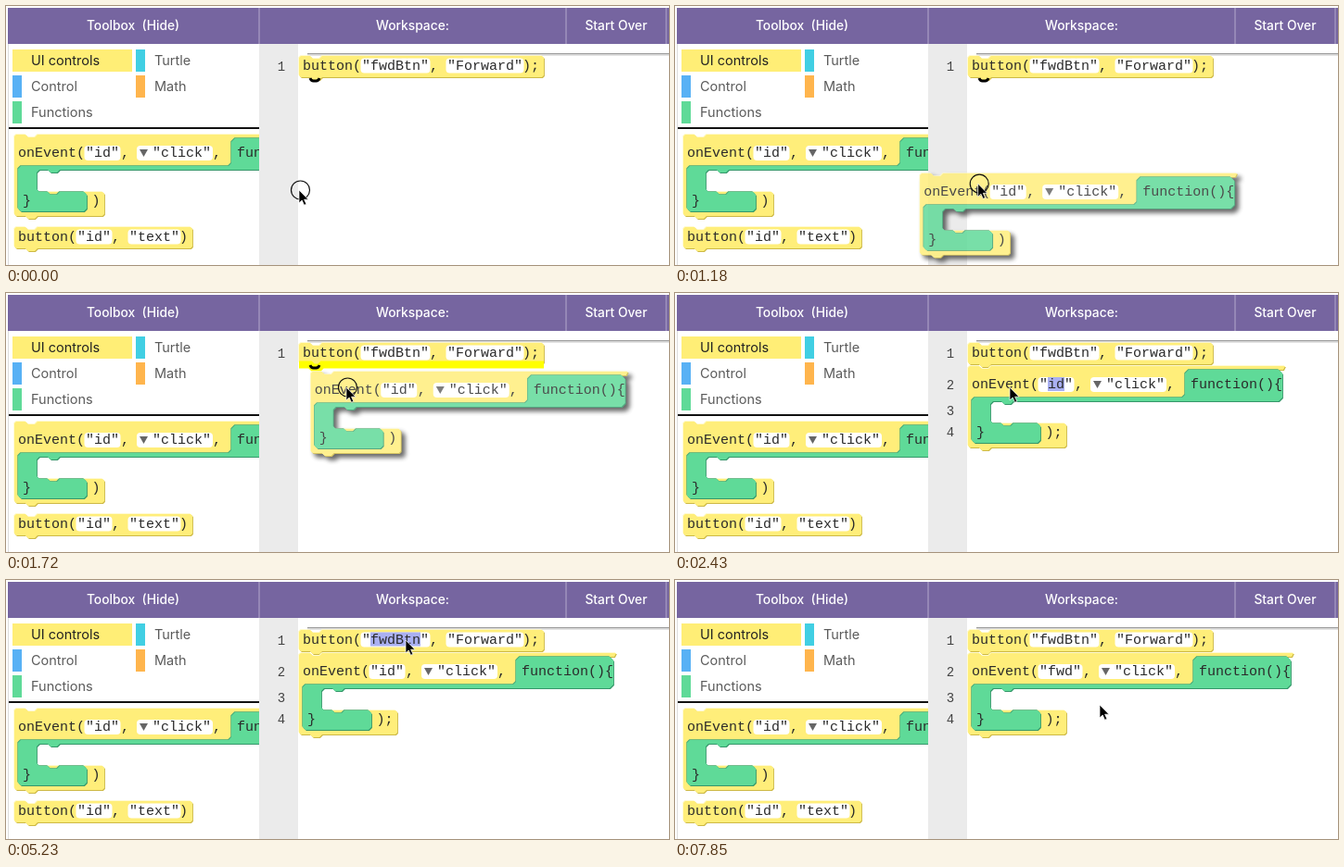
Recreate the animation shown at these times as an HTML page. Size 715 by 280 pixels, loop 8000 ms.

```html
<!DOCTYPE html>
<html lang="en">
<head>
<meta charset="utf-8">
<title>Block editor</title>
<style>
  html, body { margin: 0; width: 100%; height: 100%; overflow: hidden; background: #fff; }
  svg { display: block; width: 715px; height: 280px; }
  text { white-space: pre; }
  .ui { font: 14.5px Inter, "Open Sans", sans-serif; fill: #5b5b5b; }
  .head { font: 500 13.8px Inter, "Open Sans", sans-serif; fill: #fff; text-anchor: middle; }
  .code { font: 15px "Liberation Mono", monospace; fill: #2a2a2a; }
  .num { font: 14px "Liberation Mono", monospace; fill: #444; text-anchor: middle; }
  #drag { opacity: .84; filter: drop-shadow(4.5px 4.5px 2.5px rgba(0, 0, 0, .7)); }
</style>
</head>
<body>
<svg id="stage" viewBox="0 0 715 280"></svg>
<script>
const LOOP = 8000, CH = 9;
const YELLOW = ['#fff9c4', '#cdb945', '#ffee7a'];
const GREEN = ['#48a978', '#35976a', '#5fda98'];
const SELECT = '#aab0f2';

const rect = (x, y, w, h, fill, r = 0) =>
  `<rect x="${x}" y="${y}" width="${w}" height="${h}" rx="${r}" fill="${fill}"/>`;
const label = (cls, x, y, s) => `<text class="${cls}" x="${x}" y="${y}">${s}</text>`;
const code = (x, y, s) => label('code', x, y, s);
const group = (id, body, attrs = '') => `<g id="${id}" ${attrs}>${body}</g>`;
const at = (x, y, body) => `<g transform="translate(${x} ${y})">${body}</g>`;

// Bevelled shape: separate upper left and lower right edges.
const bevel = (d, [upper, lower, fill]) =>
  `<path d="${d}" fill="${lower}" transform="translate(.9 .9)"/>` +
  `<path d="${d}" fill="${upper}" transform="translate(-.7 -.7)"/>` +
  `<path d="${d}" fill="${fill}"/>`;

const NOTCH = 'l3 3h7l3 -3', TAB = 'l-3 3h-7l-3 -3';

function socket(x, y, word, sel) {
  const w = (word.length + 2) * CH;
  return rect(x - 1.5, y - 12, w + 3, 16, '#fff', 4) +
    (sel ? rect(x + CH, y - 12, word.length * CH, 15, SELECT) : '') +
    code(x, y, `"${word}"`);
}

function buttonBlock(id, caption, end, sel) {
  const x1 = 68, x2 = x1 + (id.length + 2) * CH + 20, y = 14.5;
  const x3 = x2 + (caption.length + 2) * CH, right = x3 + end.length * CH + 5;
  const d = `M2 0H12${NOTCH}H${right - 2}l2 2V21l-2 2H25${TAB}H2l-2 -2V2Z`;
  return bevel(d, YELLOW) + code(4, y, 'button(') + socket(x1, y, id, sel) +
    code(x2 - 19, y, ',') + socket(x2, y, caption) + code(x3, y, end);
}

function eventOutline(shift, end) {
  const foot = 87 + end.length * CH + 1;
  return `M2 0H12${NOTCH}H${342 + shift}l-2 4H${240 + shift}V36H4V62H${foot - 2}l2 2V86l-2 2` +
    `H25${TAB}H2l-2 -2V2Z`;
}

function eventBlock(id, end, sel) {
  const s = (id.length - 2) * CH;
  const arm = `M4 37l3 -3H${231 + s}l3 -3V8l4 -4H${335 + s}l4 4V34l-4 4` +
    `H49${TAB}H27l-3 3V59l3 3H36${NOTCH}H75l3 3V80l-3 3H7l-3 -3Z`;
  return bevel(eventOutline(s, end), YELLOW) + bevel(arm, GREEN) +
    code(4, 24, 'onEvent(') + socket(77, 24, id, sel) + code(115 + s, 24, ',') +
    rect(132 + s, 12, 82, 16, '#fff', 4) +
    `<path d="M${135 + s} 16h9l-4.5 8Z" fill="#666"/>` +
    code(149 + s, 24, '"click"') + code(214 + s, 24, ',') +
    code(240 + s, 24, 'function(){') + code(9, 76, '}') + code(83.5, 76, end);
}

const category = (x, y, color, name) =>
  rect(x, y, 10, 24, color) + label('ui', x + 20, y + 17, name);
const lineNo = (n, y) => label('num', 297, y, n);

const stage = document.getElementById('stage');
stage.innerHTML =
  '<clipPath id="box"><rect x="0" y="41" width="273" height="239"/></clipPath>' +
  rect(2, 41, 1, 239, '#ddd') +
  rect(273, 41, 42, 239, '#ebebeb') +
  rect(2, 2, 713, 39, '#7665a0') +
  [273, 604, 712].map(x => rect(x - .5, 2, 1, 39, '#b3a9cc')).join('') +
  label('head', 137, 26, 'Toolbox  (Hide)') +
  label('head', 438.5, 26, 'Workspace:') +
  label('head', 658, 26, 'Start Over') +
  rect(7, 47, 129, 24, '#ffee76') +
  '<text class="ui" x="27" y="64" style="fill:#222">UI controls</text>' +
  category(140, 47, '#41cfe3', 'Turtle') +
  category(7, 75, '#58b1f5', 'Control') +
  category(140, 75, '#ffb54d', 'Math') +
  category(7, 103, '#5fda98', 'Functions') +
  rect(3, 131, 270, 2, '#111') +
  group('palette',
    at(9, 139, eventBlock('id', ')') +
      `<path id="hover" d="${eventOutline(0, ')')}" fill="none" stroke="#ff0" stroke-width="3"/>`) +
    at(9, 239, buttonBlock('id', 'text', ')')),
    'clip-path="url(#box)"') +
  rect(325, 51, 390, 1.5, '#9c9c9c') + rect(325, 52.5, 390, 1.5, '#e2e2e2') +
  lineNo(1, 69.5) +
  group('first', '') +
  group('target', `<path d="M316 77.500H328${NOTCH}H580" fill="none" stroke="#ff0" stroke-width="8"/>`) +
  group('smile', '<path d="M328 78q1 3 3.500 3h3q2.500 0 3.500 -3" fill="none" stroke="#000" stroke-width="2.800"/>') +
  group('lines', lineNo(2, 103.5) + lineNo(3, 132) + lineNo(4, 155)) +
  group('second', '') +
  group('caret', rect(0, 92, 1.4, 13, '#222')) +
  group('dragAt', group('drag', eventBlock('id', ')'))) +
  group('ring', '<circle cx="1.500" cy="0" r="10" fill="none" stroke="#111" stroke-width="1.2"/>') +
  group('arrow', '<path d="M0 0V14l3.200 -3 2.300 5.200 2.400 -1 -2.300 -5H10Z" fill="#000" stroke="#fff" stroke-width=".7"/>');

const $ = id => document.getElementById(id);
const show = (id, on) => $(id).setAttribute('visibility', on ? 'visible' : 'hidden');
const move = (id, x, y) => $(id).setAttribute('transform', `translate(${x} ${y})`);
const within = (t, a, b) => t >= a && t < b;

// Pointer path: time, x, y
const PATH = [
  [0, 316, 199], [300, 316, 199], [850, 51, 157], [1070, 52, 157], [1130, 190, 199],
  [1165, 301, 198], [1180, 326, 192.5], [1330, 396, 142], [1500, 384, 109], [1720, 367, 102],
  [1890, 361, 102], [2430, 361, 102], [2830, 433, 95], [3010, 433, 95], [3130, 480, 149],
  [3430, 480, 149], [4000, 416, 103], [4180, 416, 103], [4480, 446, 82], [4820, 431, 65],
  [5590, 431, 65], [5720, 412, 98], [5880, 412, 98], [6170, 458, 135], [LOOP, 458, 135]
];

const slope = (i, k) => i < 0 || i > PATH.length - 2 ? 0 :
  (PATH[i + 1][k] - PATH[i][k]) / (PATH[i + 1][0] - PATH[i][0]);

// Monotone tangent: zero at rests and turns.
function tangent(i, k) {
  const a = slope(i - 1, k), b = slope(i, k);
  return a * b > 0 ? 2 * a * b / (a + b) : 0;
}

function pointer(t) {
  let i = 0;
  while (i < PATH.length - 2 && PATH[i + 1][0] <= t) i++;
  const h = PATH[i + 1][0] - PATH[i][0], u = (t - PATH[i][0]) / h, v = 1 - u;
  return [1, 2].map(k =>
    (1 + 2 * u) * v * v * PATH[i][k] + u * u * (3 - 2 * u) * PATH[i + 1][k] +
    h * u * v * (v * tangent(i, k) - u * tangent(i + 1, k)));
}

const cache = {};
function fill(id, key, make) {
  if (cache[id] === key) return;
  cache[id] = key;
  $(id).innerHTML = make();
}

function draw(t) {
  const [x, y] = pointer(t);
  const dropped = t >= 2430, dragging = within(t, 1030, 2430);
  const word = t < 6650 ? 'id' : t < 6830 ? 'f' : t < 7130 ? 'fw' : 'fwd';
  const idSel = within(t, 2430, 5120) || within(t, 5800, 6650);
  const btnSel = within(t, 5230, 5770);

  fill('first', btnSel, () => at(316, 54, buttonBlock('fwdBtn', 'Forward', ');', btnSel)));
  fill('second', word + idSel, () => at(316, 79, eventBlock(word, ');', idSel)));

  show('second', dropped);
  show('lines', dropped);
  show('smile', !dropped);
  show('target', within(t, 1400, 2430));
  show('hover', t < 1030 && x < 262);
  show('caret', within(t, 6650, 7850));
  move('caret', 402.3 + word.length * CH, 0);

  show('dragAt', dragging);
  const [bx, by] = pointer(Math.max(0, t - 15));
  move('dragAt', bx - 39, by - 17);

  show('ring', t < 60 || dragging || within(t, 5120, 5230) || within(t, 5770, 5870));
  move('ring', x, y);
  move('arrow', x, y);
}

const start = performance.now();
function tick() {
  draw((performance.now() - start) % LOOP);
  requestAnimationFrame(tick);
}
tick();
</script>
</body>
</html>
```
